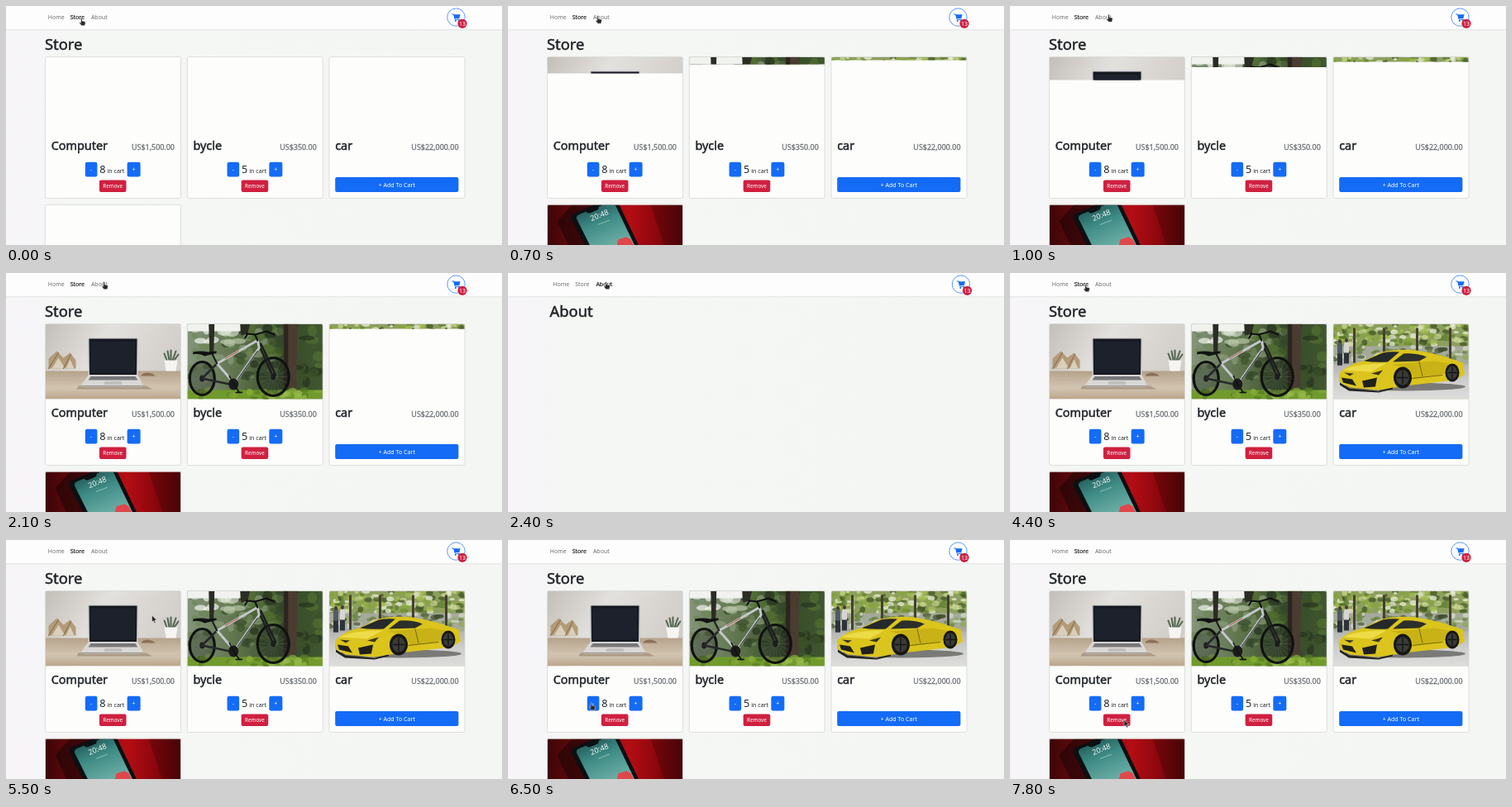
Recreate the animation shown at these times as an HTML page. Size 600 by 289 pixels, loop 8 s.

```html
<!DOCTYPE html>
<html lang="en">
<head>
<meta charset="utf-8">
<title>Store</title>
<style>
  html, body { margin: 0; width: 100%; height: 100%; overflow: hidden; background: #f5f7f4; }
  #stage { display: block; width: 600px; height: 289px; font-family: "Noto Sans", "Open Sans", sans-serif; }
  text { fill: #212529; }
  .h { stroke: #212529; stroke-width: .5px; }
  .price { fill: #6c7175; stroke: #6c7175; stroke-width: .28px; text-anchor: end; }
  .on { fill: #fff; text-anchor: middle; }
  .nav text { fill: #6f6f6f; }
  .nav text.active { fill: #111; stroke: #111; stroke-width: .15px; }
</style>
</head>
<body>
<svg id="stage" viewBox="0 0 600 289"></svg>
<script>
const LOOP = 8000;
const BLUE = '#146bf5', RED = '#cf2040';
const stage = document.getElementById('stage');

let seed = 7;
const rnd = () => (seed = (seed * 16807) % 2147483647) / 2147483647;

const rect = (x, y, w, h, fill, extra = '') =>
  `<rect x="${x}" y="${y}" width="${w}" height="${h}" fill="${fill}" ${extra}/>`;
const path = (d, fill, extra = '') => `<path d="${d}" fill="${fill}" ${extra}/>`;
const line = (d, color, w) =>
  path(d, 'none', `stroke="${color}" stroke-width="${w}" stroke-linecap="round" stroke-linejoin="round"`);
const oval = (x, y, rx, ry, fill, extra = '') =>
  `<ellipse cx="${x}" cy="${y}" rx="${rx}" ry="${ry}" fill="${fill}" ${extra}/>`;
const text = (x, y, size, str, cls = '') =>
  `<text x="${x}" y="${y}" font-size="${size}" class="${cls}">${str}</text>`;
const button = (x, y, w, h, fill, label, size, base) =>
  rect(x, y, w, h, fill, 'rx="2.2"') + text(x + w / 2, base, size, label, 'on');

// Scatter soft blobs of leaves over a box.
function leaves(n, x, y, w, h, colors, size) {
  let s = '';
  for (let i = 0; i < n; i++) {
    s += oval((x + rnd() * w).toFixed(1), (y + rnd() * h).toFixed(1),
      (size * (.5 + rnd())).toFixed(1), (size * (.4 + rnd() * .6)).toFixed(1),
      colors[i % colors.length], 'opacity=".7"');
  }
  return s;
}

function laptop() {
  return rect(0, 0, 164, 91, 'url(#wall)') +
    rect(0, 57, 164, 34, 'url(#desk)') +
    line('M0 66h164M0 78h164', '#c9b8a2', .5) +
    path('M4 54V42l10-9 8 8 8-6 7 9v10z', '#b39b78') +
    path('M8 54l8-13 8 13zM25 54l5-11 5 11z', '#d9cfbc') +
    line('M4 54L16 35M22 54L31 37', '#8a7250', 1.2) +
    line('M147 44l-3-8M150 44l-2-11M152 44V32M154 44l4-11M156 44l5-7', '#50654f', 2) +
    path('M144 44h16l-2 13h-12z', '#f6f5f2') +
    path('M117 61q6-4 14 0l2 2h-17z', '#8b7158') +
    path('M40 75h82l8 4H38z', '#91806c', 'opacity=".6"') +
    path('M53 17h58q1.500 0 1.500 1.500L112 63H52L51.500 18.500Q51.500 17 53 17z', '#c9cacc') +
    path('M53 18h58l-.5 43.500h-57z', '#15181f') +
    rect(55, 21, 54, 38, '#1c212b') +
    path('M52 62h60l6 11-1 3H45l-1-3z', '#d9d8d6') +
    path('M55 63.500h54l3 4.500H52z', '#77777a') +
    path('M72 69.500h20l1 4H71z', '#c0bfbe') +
    line('M45 75h72', '#918a82', .9);
}

function bike() {
  const wheel = (x, y, rx, ry) =>
    oval(x, y, rx, ry, '#22281f', 'opacity=".35"') +
    oval(x, y, rx, ry, 'none', 'stroke="#0f1210" stroke-width="3.200"') +
    Array.from({ length: 9 }, (_, i) => {
      const a = i * Math.PI / 9, dx = Math.cos(a) * (rx - 2), dy = Math.sin(a) * (ry - 2);
      return line(`M${x - dx} ${y - dy}L${x + dx} ${y + dy}`, '#757d72', .25);
    }).join('') + oval(x, y, 3, 4, '#1b1d1d');
  return rect(0, 0, 164, 91, 'url(#wood)') +
    leaves(55, 0, 8, 115, 60, ['#4d6636', '#6f8658', '#34462a', '#8b9c7a'], 6) +
    leaves(35, 60, 0, 104, 72, ['#26331e', '#3d5228', '#52702f'], 7) +
    leaves(22, 0, 0, 66, 24, ['#f3f5f0', '#dce4d3', '#b8c6a8'], 6) +
    rect(0, 0, 64, 9, '#f0f2ed') +
    path('M26 0h7l-1 36h-5zM64 0h12l-3 12-8 2z', '#2b2c25') +
    path('M116 0h17l-1 78h-15z', '#4a3c31') + rect(117, 0, 5, 76, '#2b241f') +
    rect(0, 80, 164, 11, '#719a2c') +
    leaves(30, 0, 78, 164, 13, ['#86ac37', '#567d22', '#9bbb4e'], 4) +
    wheel(18, 66, 15, 20) + wheel(104, 64, 19, 23) +
    line('M36 48L18 66L56 74', '#26282a', 2.6) +
    line('M86 24L104 64M89 24l18 38', '#1b1d1f', 2.4) +
    line('M36 48L85 20L87 29L57 72L36 48', '#c4c8cc', 2.8) +
    line('M61 67L85 33', '#34383b', 1.2) + line('M46 42l16-9', '#b54b35', 1) +
    line('M36 48L30 36', '#1a1b1c', 2) +
    path('M7 34q10-2 18 0l10-1q2 2-2 3l-12 3q-7-4-14-2z', '#111212') +
    line('M85 20L82 13M72 12l10 1 14-4 9 4M73 12l-3 5', '#101112', 2.2) +
    oval(56, 73, 6, 7, '#1a1b1b') + line('M56 73l7 10m-4 0h7M56 73l-5-10', '#111', 1.6);
}

function car() {
  const wheel = (x, y, rx, ry) => oval(x, y, rx, ry, '#161715') +
    oval(x, y, rx * .72, ry * .72, '#3a3b37') +
    line(`M${x - rx * .6} ${y}h${rx * 1.2}M${x} ${y - ry * .6}v${ry * 1.2}`, '#151614', 1.4);
  return rect(0, 0, 164, 91, '#8d9f5c') +
    leaves(150, 0, 0, 164, 27, ['#a4bf4e', '#5c7b30', '#cddb98', '#3c5322', '#f0f3e4', '#86a53e'], 3.6) +
    rect(0, 27, 164, 27, '#a5aa9b') +
    leaves(60, 0, 28, 164, 15, ['#647f38', '#404f2d', '#8fa955', '#d9decf'], 3.6) +
    [24, 60, 100, 140].map(x => rect(x, 5, 3, 42, '#453f33')).join('') +
    rect(0, 49, 164, 42, 'url(#road)') +
    path('M5 50V25q3-5 6 0v25z', '#515b69') + path('M13 48V24q3-6 6 0v24z', '#d8d5d2') +
    path('M5 50V36h6v14zM13 48V35h6v13z', '#2d323b') +
    oval(8, 21, 2, 2.4, '#4a3b35') + oval(16, 20, 2, 2.4, '#4a3b35') +
    oval(86, 76, 74, 5, '#4a4b48', 'opacity=".65"') +
    path('M7 61Q13 51 36 45L59 34Q78 30 100 32Q126 36 145 43L157 47L159 61L148 68L95 74L54 80L20 77L7 70z', '#dbc41c') +
    path('M37 45L60 35Q69 33 80 34L66 46Q50 47 37 45z', '#25292b') +
    path('M72 46L85 36Q100 35 113 40L104 45z', '#2c2f2a') +
    path('M12 56Q26 48 64 48L46 58z', '#eddc48') +
    path('M70 49L122 45L152 50L132 61L98 67L93 55z', '#c9b215') +
    line('M95 66L132 62M104 46l4 17', '#6d5f0b', .9) +
    path('M10 65l13 2 5 8-16-4zM35 69l18-4-2 11-14 1z', '#20211c') +
    path('M13 59l12 1-5 3zM46 60l14-4-5 6z', '#3a3821') +
    path('M8 71L20 78L55 81L72 77v2l-17 4-36-2-11-7z', '#24251f') +
    wheel(84, 65, 11, 13) + wheel(144, 59, 8.5, 11);
}

function phone() {
  return rect(0, 0, 164, 50, 'url(#cloth)') +
    path('M30 0h36L30 15 46 50H26L12 20z', '#170405', 'opacity=".55"') +
    path('M125 0h39v50h-22z', '#3d0406', 'opacity=".35"') +
    path('M30 19Q27 13 33 10L57 0H87L111 50H46z', '#0d0f11') +
    path('M36 18Q34 14 38 12L68 0H82L106 50H52z', 'url(#screen)') +
    path('M47 8L62 2q1 4-3 5l-7 3q-4 1-5-2z', '#0d0f11') +
    path('M86 42l10-3 5 3 4 8H84z', '#e0474b') +
    `<text transform="translate(53.500 20) rotate(-22)" font-size="9" style="fill:#f4f8f6">20:48</text>` +
    line('M62 24l13-5', '#c7dcd8', .6);
}

const gradient = (id, dir, ...stops) =>
  `<linearGradient id="${id}" x2="${dir[0]}" y2="${dir[1]}">` +
  stops.map(([o, c]) => `<stop offset="${o}" stop-color="${c}"/>`).join('') + '</linearGradient>';

const defs = '<defs>' +
  gradient('page', [1, 0], [0, '#f7f5f8'], [.07, '#f6f5f7'], [.12, '#f5f7f4'], [1, '#f4f6f3']) +
  gradient('shade', [0, 1], [0, '#dcdddc'], [1, '#f5f6f4']) +
  gradient('wall', [1, .3], [0, '#c3beb8'], [.45, '#e3e1de'], [1, '#d2cec9']) +
  gradient('desk', [0, 1], [0, '#b5a28a'], [.6, '#d3c5b2'], [1, '#baa58b']) +
  gradient('wood', [1, 0], [0, '#84957a'], [.4, '#5b7047'], [.7, '#34472a'], [1, '#40582f']) +
  gradient('road', [0, 1], [0, '#b4b5b1'], [.5, '#cfd0cd'], [1, '#dddddb']) +
  gradient('cloth', [1, 0], [0, '#3d0507'], [.25, '#6b0a0e'], [.6, '#b50d14'], [.8, '#8d070d'], [1, '#4d0406']) +
  gradient('screen', [.6, 1], [0, '#174a4c'], [.5, '#3f8c86'], [1, '#6bada5']) +
  '</defs>';

const GAP = 171.75;
const photos = [laptop, bike, car, phone];

function card(i, name, price, count) {
  const x = (i % 3) * GAP, y = i < 3 ? 61.5 : 240.2;
  let s = `<g transform="translate(${x} 0)">` + rect(47.5, y, 164, 171, '#fdfdfc', 'rx="2.200"') +
    `<svg class="photo" x="47.500" y="${y}" width="164" height="0">${photos[i]()}</svg>` +
    rect(47.5, y, 164, 171, 'none', 'rx="2.200" stroke="#d6d7d6" stroke-width=".8"');
  if (name) {
    s += text(54.7, 173.8, 14.4, name, 'h') + text(204, 173.6, 8.95, price, 'price');
    s += count
      ? button(95.8, 188.7, 14.6, 17.8, BLUE, '-', 7, 200) + button(146.6, 188.7, 16, 17.8, BLUE, '+', 7, 200) +
        text(113.3, 202.2, 12.7, count) + text(122.5, 202.2, 7.05, 'in cart') +
        button(112.9, 210.4, 32.6, 14.5, RED, 'Remove', 6.3, 220)
      : button(54.7, 207.1, 149.2, 17.9, BLUE, '+ Add To Cart', 7.05, 218.6);
  }
  return s + '</g>';
}

const cart = `<circle cx="544.500" cy="13.600" r="10.700" fill="#fefefe" stroke="${BLUE}" stroke-width=".7"/>` +
  line('M539.700 10h1.800l1.800 6.300h5.500', BLUE, 1) +
  path('M541.600 10.200h8l-1.300 4.800h-5.500z', BLUE) +
  oval(543.8, 18, 1, 1, BLUE) + oval(548, 18, 1, 1, BLUE) +
  oval(552, 21.3, 5.6, 5.6, RED) + text(552, 23.8, 7.1, '13', 'on');

stage.innerHTML = defs + rect(0, 0, 600, 289, 'url(#page)') +
  rect(0, 28, 600, 2, 'url(#shade)') + rect(0, 0, 600, 28.2, '#fdfdfd') +
  '<g id="bar"><g class="nav">' +
  [[50.8, 'Home'], [77.7, 'Store'], [102.9, 'About']].map(([x, s]) => text(x, 16.4, 7, s)).join('') +
  '</g>' + cart + text(47, 52.5, 18.4, '', 'h title') + '</g>' +
  '<g id="store">' + card(0, 'Computer', 'US$1,500.00', 8) + card(1, 'bycle', 'US$350.00', 5) +
  card(2, 'car', 'US$22,000.00') + card(3) + '</g>' +
  '<g id="cursor" stroke="#f4f4f4" stroke-width=".5" stroke-linejoin="round">' +
  path('M-.8.600Q0-.500.800.600V3.600L4 4.300Q5 4.600 4.800 6L4 9.300H0L-2.400 6.300Q-2.700 5-1.500 5.300L-.8 6z', '#2a2a2c') +
  path('M0 0V8.200L1.900 6.500L3.200 9.500L4.600 8.900L3.300 6H5.900z', '#222') + '</g>';

const $ = s => stage.querySelector(s);
const bar = $('#bar'), store = $('#store'), cursor = $('#cursor'), title = $('.title');
const links = [...stage.querySelectorAll('.nav text')];
const shots = [...stage.querySelectorAll('.photo')];
const [hand, arrow] = cursor.children;

// time, visible height of each photo
const LOADS = [
  [0, 0, 0, 0, 0], [300, 8, 3, 0, 14], [500, 14, 6, 2, 32], [700, 20, 9, 4, 50],
  [900, 28, 12.5, 6, 50], [2100, 91, 91, 6, 50], [2400, 91, 91, 91, 50]
];

// time, x, y, 1 for the hand
const MOVES = [
  [0, 91.3, 14.5, 1], [200, 91.3, 14.5, 1], [600, 105, 12.5, 1], [1000, 119.3, 10, 1], [1400, 118.7, 10.4, 1],
  [1800, 118.5, 10.4, 1], [2900, 118.5, 10.4, 1], [3400, 92, 12.6, 1], [3600, 91.5, 13.4, 1],
  [5100, 91.5, 13.4, 1], [5200, 104, 22, 0], [5400, 150, 60, 0], [5600, 203, 122, 0], [5800, 160, 175, 0],
  [6000, 104, 196.5, 1], [6500, 100.8, 196.5, 1], [6600, 104, 202, 0], [6900, 146, 222, 0],
  [7100, 142, 218.6, 0], [7200, 142, 218.6, 0], [7300, 138.3, 216, 0], [7500, 138.3, 216, 0],
  [7600, 139, 217.4, 0], [7800, 138, 217.4, 0]
];

const rowAt = (table, t) => table.findLastIndex(r => r[0] <= t);

function draw(now) {
  const t = Math.floor((now % LOOP) / 100) * 100;
  const about = t >= 2400 && t < 4400;

  bar.setAttribute('transform', `translate(${about ? 3.5 : 0} 0)`);
  store.style.display = about ? 'none' : '';
  title.textContent = about ? 'About' : 'Store';
  links.forEach((a, i) => a.classList.toggle('active', i === (about ? 2 : 1)));

  const load = LOADS[rowAt(LOADS, t)];
  shots.forEach((s, i) => s.setAttribute('height', load[i + 1]));

  const k = rowAt(MOVES, t), a = MOVES[k], b = MOVES[k + 1] || a;
  const p = (t - a[0]) / (b[0] - a[0] || 1);
  const at = i => a[i] + (b[i] - a[i]) * p;
  cursor.setAttribute('transform', `translate(${at(1)} ${at(2)})`);
  hand.style.display = a[3] ? '' : 'none';
  arrow.style.display = a[3] ? 'none' : '';
}

const start = performance.now();
function tick() {
  draw(performance.now() - start);
  requestAnimationFrame(tick);
}
tick();
</script>
</body>
</html>
```
